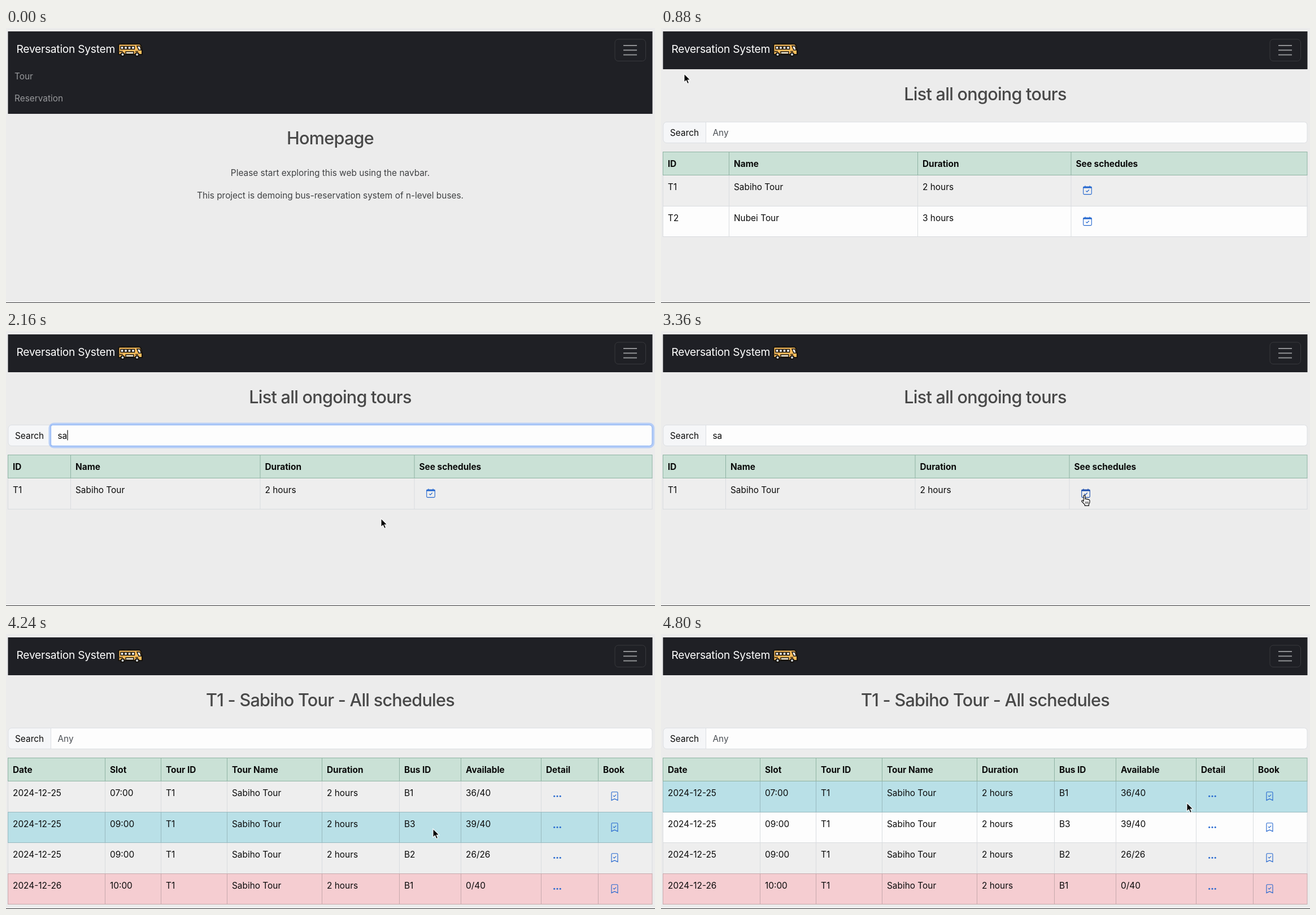
These frames come from a looping animation (1149x487 px, 4.88 s). An HTML page:

```html
<!DOCTYPE html>
<html lang="en">
<head>
<meta charset="utf-8">
<title>Reversation System</title>
<style>
html, body { margin: 0; width: 100%; height: 100%; overflow: hidden; background: #ececec; }
svg { display: block; }
text { font: 15.4px Inter, "Liberation Sans", sans-serif; font-optical-sizing: none; white-space: pre; }
.title { font-size: 30.6px; font-weight: 500; letter-spacing: -.75px; text-anchor: middle; }
.brand { font-size: 19.2px; letter-spacing: -.25px; }
.bold { font-weight: 700; }
.mid { text-anchor: middle; }
</style>
</head>
<body>
<svg id="stage" width="1149" height="487" viewBox="0 0 1149 487"></svg>
<script>
const LOOP = 4880, STEP = 80;
const LIST_AT = 640, FOCUS_AT = 1360, KEY_S = 1760, KEY_A = 1920, BLUR_AT = 2760, DETAIL_AT = 3440;
const LEFT = 3.5, RIGHT = 1144.5;
const stage = document.getElementById('stage');

// pointer path: time, x, y
const path = [
  [0, 232, -40], [80, 222, 0], [240, 130, 62], [400, 62, 102], [560, 42, 84], [640, 41, 81],
  [880, 41, 81], [1120, 300, 150], [1280, 560, 180], [1440, 590, 186], [1680, 664, 332],
  [2160, 664, 332], [2240, 666, 320], [2720, 752, 287], [3360, 752, 287], [3440, 753, 287],
  [3760, 753, 287], [4080, 755, 297], [4400, 757, 393], [4480, 764, 390], [4640, 850, 345], [4800, 931, 299], [4880, 931, 299]
];

function pointer(t) {
  const i = path.findIndex(p => p[0] > t);
  const [t0, x0, y0] = path[i - 1], [t1, x1, y1] = path[i];
  const k = (t - t0) / (t1 - t0);
  return [x0 + (x1 - x0) * k, y0 + (y1 - y0) * k];
}

const text = (x, y, s, fill = '#0a0a0a', cls = '') => `<text x="${x}" y="${y}" fill="${fill}" class="${cls}">${s}</text>`;
const rect = (x, y, w, h, fill, extra = '') => `<rect x="${x}" y="${y}" width="${w}" height="${h}" fill="${fill}" ${extra}/>`;
const line = (d, color, w = 1) => `<path d="${d}" fill="none" stroke="${color}" stroke-width="${w}"/>`;
const at = (x, y, s) => `<g transform="translate(${x} ${y})">${s}</g>`;

const bus = at(198, 27,
  '<path d="M1.5 3Q1.5 1.5 3 1.5H38Q40 1.5 41 4L43 12V20H1.5Z" fill="#fabd5c" stroke="#15120e" stroke-width="2"/>' +
  line('M6 1H12M17 1H23', '#15120e', 2) +
  [5, 11.5, 18, 24.5].map(x => rect(x, 5.5, 5, 5, '#fff', 'stroke="#15120e" stroke-width="1.5"')).join('') +
  '<path d="M34 5H39L41.5 12H37Z" fill="#fff" stroke="#15120e" stroke-width="1.5"/>' +
  line('M3 14.5H9M31 14.5H36', '#15120e', 1.5) +
  rect(14, 15, 14, 4, '#fff3dc', 'stroke="#15120e" stroke-width="1.5"') +
  [8.5, 34].map(x => `<circle cx="${x}" cy="20" r="3" fill="#c9d0d6" stroke="#15120e" stroke-width="2"/>`).join(''));

function navbar(open, y) {
  let s = rect(LEFT, 6, RIGHT - LEFT, open ? 146 : 67, '#1f2025') +
    text(18.5, 44, 'Reversation System', '#fff', 'brand') + bus +
    rect(1078, 20, 54.5, 38.5, 'none', 'rx="6" stroke="#38393d"') +
    line('M1093 31H1117M1093 39.3H1117M1093 47.5H1117', '#909194', 1.9);
  if (open) {
    s += text(15, 91, 'Tour', y > 66 && y < 105 ? '#c6c7c9' : '#98999c') +
      text(15, 130, 'Reservation', '#98999c');
  }
  return s;
}

function search(value, focus, caret) {
  const box = 'M79.5 166.5H1138.5Q1144 166.5 1144 172.5V197.5Q1144 203.5 1138.5 203.5H79.5Z';
  let s = rect(4, 166.5, 90, 37, '#f5f6f8', 'rx="6" stroke="#dcdfe3"') +
    text(16, 190.5, 'Search') +
    `<path d="${box}" fill="#fdfdfd" stroke="#dcdfe3"/>`;
  if (focus) {
    s += `<g opacity="${focus}">` +
      rect(77.5, 164.5, 1068.5, 41, 'none', 'rx="7" stroke="#b5cdf7" stroke-width="4"') +
      line(box, '#86b0f5') + '</g>';
  }
  s += value ? text(91.5, 190.5, value) : text(91.5, 190.5, 'Any', '#4b4f54');
  if (caret) s += line(`M${[92, 100.5, 109][value.length]} 175.5V193.5`, '#111', 1.2);
  return s;
}

const icons = {
  calendar: color => line('M.7 3.2Q.7 1.7 2.2 1.7H13.8Q15.3 1.7 15.3 3.2V13.8Q15.3 15.3 13.8 15.3H2.2Q.7 15.3 .7 13.8ZM4 0V2M12 0V2M5.3 9L7.2 10.9 10.8 7.2', color, 1.1) +
    rect(.7, 1.7, 14.6, 2.6, color),
  dots: color => [2.2, 7.5, 12.8].map(x => `<circle cx="${x}" cy="8" r="1.5" fill="${color}"/>`).join(''),
  mark: color => line('M2.5 2Q2.5.5 4 .5H12Q13.5.5 13.5 2V15.3L8 12.6 2.5 15.3ZM5.5 6.8L7.3 8.6 10.6 5.3', color, 1.1)
};

const rowTop = i => Math.floor(260.8 + 54.5 * i) + .5;

function band(cols, y, h, fill, border) {
  return rect(LEFT, y, RIGHT - LEFT - .5, h, fill, `stroke="${border}"`) +
    line(cols.slice(1).map(x => `M${x} ${y}v${h}`).join(''), border);
}

// tint: '' for stripes, 'red' for full tours; hover is a row index or -1
function table(cols, head, rows, hover = -1, iconColor = '#2467cf') {
  const out = rows.map((cells, i) => {
    const y = rowTop(i), full = cells.includes('0/40');
    const [fill, border] = i === hover ? ['#b9e0e7', '#98b9bf']
      : full ? ['#f5cdd1', '#c6a9ac'] : [i % 2 ? '#fdfdfd' : '#eeeeee', '#d9dcdf'];
    return band(cols, y, rowTop(i + 1) - y, fill, border) + cells.map((c, j) =>
      icons[c] ? at(cols[j] + 21, y + 18.8, icons[c](iconColor)) : text(cols[j] + 8.5, y + 26, c)).join('');
  });
  if (hover >= 0) out.push(...out.splice(hover, 1));
  return out.join('') + band(cols, 219.5, 41, '#cae1d6', '#8fb3a3') +
    head.map((h, j) => text(cols[j] + 8.5, 246, h, '#0a0a0a', 'bold')).join('');
}

const title = (y, s) => text(574, y, s, '#484848', 'title');

const tourHead = ['ID', 'Name', 'Duration', 'See schedules'];
const tours = [['T1', 'Sabiho Tour', '2 hours', 'calendar'], ['T2', 'Nubei Tour', '3 hours', 'calendar']];
const planHead = ['Date', 'Slot', 'Tour ID', 'Tour Name', 'Duration', 'Bus ID', 'Available', 'Detail', 'Book'];
const planCols = [3.5, 175.5, 274.5, 391.5, 559.5, 696.5, 805.5, 947.5, 1048.5];
const plans = [
  ['2024-12-25', '07:00', 'B1', '36/40'], ['2024-12-25', '09:00', 'B3', '39/40'],
  ['2024-12-25', '09:00', 'B2', '26/26'], ['2024-12-26', '10:00', 'B1', '0/40']
].map(([date, slot, id, free]) => [date, slot, 'T1', 'Sabiho Tour', '2 hours', id, free, 'dots', 'mark']);

const cursors = {
  arrow: '<path d="M0 0V15.2L3.5 11.9 6 17.6 8.6 16.5 6.2 11H11Z" fill="#000" stroke="#fff" stroke-width="1.1"/>',
  hand: at(-8, 3, '<path d="M4.2 1.6Q5.5 0 6.9 1.6V7.6Q8.4 6.6 9.6 8Q11 7 12.2 8.6Q14 8 15 10V13.2Q14.6 15.5 13.4 17V19.3H6.4V17.6Q4 15 1 12Q.2 9.8 2.4 10L4.2 11.4Z" fill="#fff" stroke="#111" stroke-width="1.2"/>' +
    line('M7.8 12V16M10 12V16M12.2 12V16', '#111', .9)),
  beam: line('M-3 -8Q0 -8 0 -6Q0 -8 3 -8M0 -6V6M-3 8Q0 8 0 6Q0 8 3 8', '#222', 1.2)
};

const clamp = v => Math.max(0, Math.min(1, v));

function scene(t) {
  const [x, y] = pointer(t);
  let s, cursor = 'arrow';
  if (t < LIST_AT) {
    if (y > 22 && y < 54 && x < 242 || y > 66 && y < 105) cursor = 'hand';
    s = navbar(true, y) + title(206, 'Homepage') +
      text(574, 262, 'Please start exploring this web using the navbar.', '#3f4143', 'mid') +
      text(574, 301.5, 'This project is demoing bus-reservation system of n-level buses.', '#3f4143', 'mid');
  } else if (t < DETAIL_AT) {
    const value = t < KEY_S ? '' : t < KEY_A ? 's' : 'sa';
    const focus = clamp((t - FOCUS_AT + 75) / 150) * clamp((BLUR_AT + 120 - t) / 150);
    const lastKey = [FOCUS_AT, KEY_S, KEY_A][value.length];
    const caret = t >= FOCUS_AT && t < BLUR_AT && (t - lastKey) % 1060 < 530;
    const overIcon = value && x > 735 && x < 771 && y > 270 && y < 306;
    if (overIcon) cursor = 'hand';
    else if (x > 79 && y > 166 && y < 204) cursor = 'beam';
    s = navbar(false) + title(127.5, 'List all ongoing tours') + search(value, focus, caret) +
      table(value ? [3.5, 114.5, 450, 723] : [3.5, 120.5, 454.5, 726], tourHead,
        tours.filter(r => r[1].toLowerCase().includes(value)), -1, overIcon ? '#1d4fae' : '#2467cf');
  } else {
    s = navbar(false) + title(127.5, 'T1 - Sabiho Tour - All schedules') + search('', 0, false) +
      table(planCols, planHead, plans, Math.floor((y - 260.5) / 54.5));
  }
  return rect(0, 0, 1149, 487, '#ececec') + s + rect(0, 486, 1149, 1, '#3a3a3c') + at(x, y, cursors[cursor]);
}

let shown = -1;
function frame(now) {
  const t = Math.floor(now % LOOP / STEP) * STEP;
  if (t !== shown) stage.innerHTML = scene(shown = t);
  requestAnimationFrame(frame);
}
frame(performance.now());
</script>
</body>
</html>
```
